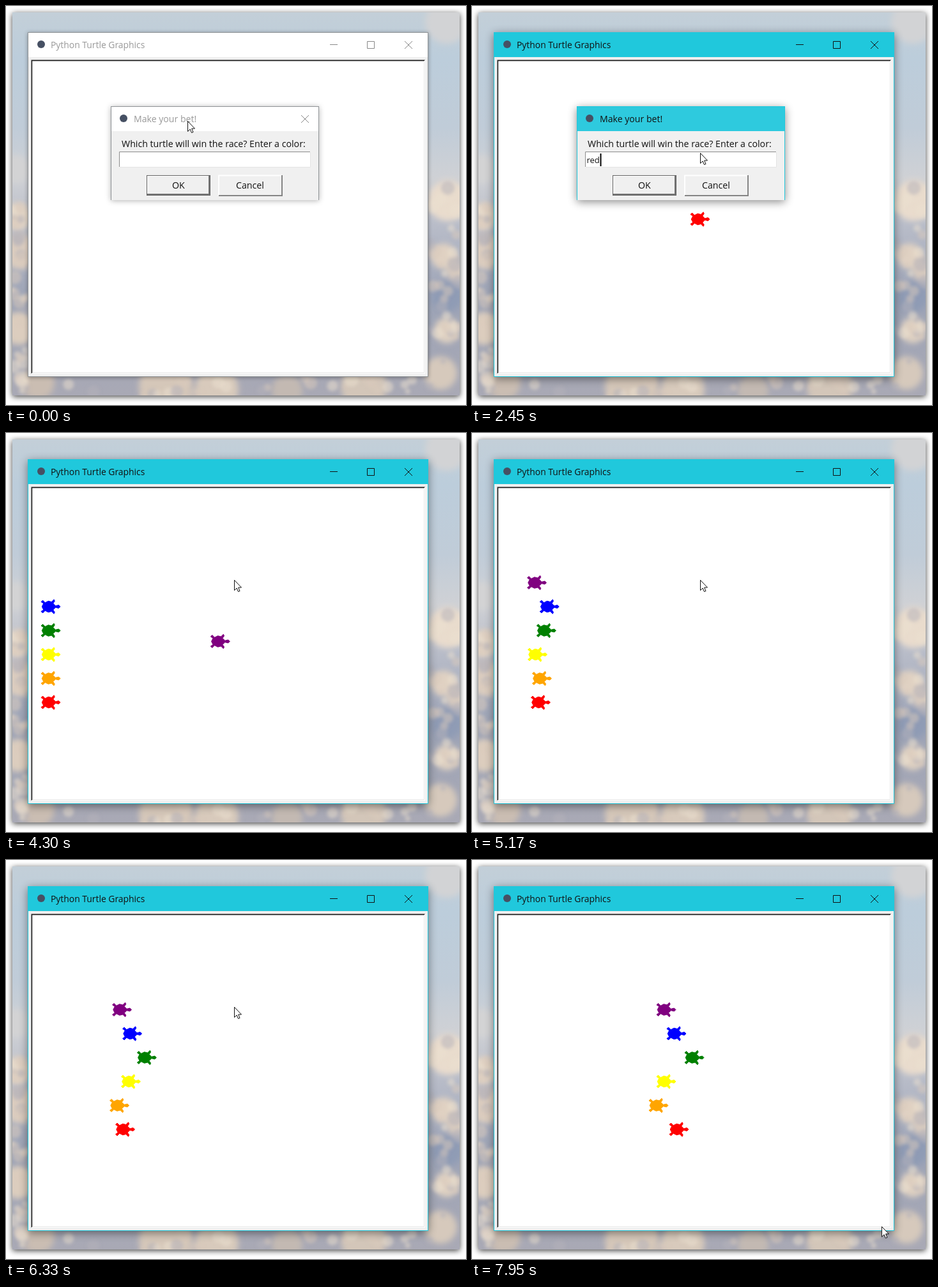
Write an HTML page that moves like this. It is 720 by 625 pixels and loops after 8000 ms.

```html
<!DOCTYPE html>
<html lang="en">
<head>
<meta charset="utf-8">
<title>Turtle race</title>
<style>
  html, body { margin: 0; width: 100%; height: 100%; overflow: hidden; background: #fff; }
  svg { display: block; width: 720px; height: 625px; }
  text { font: 14.2px "Open Sans", "Noto Sans", sans-serif; fill: #111; }
  .title { font-size: 13.9px; }
  #frame { filter: drop-shadow(0 1px 3px rgba(0,0,0,.35)); }
  .on #frame { filter: drop-shadow(0 3px 7px rgba(0,0,0,.45)); }
  #box { filter: drop-shadow(0 1px 4px rgba(0,0,0,.3)); }
  .on #box { filter: drop-shadow(0 3px 7px rgba(0,0,0,.45)); }
  .edge { fill: #8f9396; }
  .bar { fill: #fff; }
  .title { fill: #999; }
  .ctl { fill: none; stroke: #888; }
  .on .edge, .on .bar { fill: #20c8dc; }
  .on .title { fill: #111; }
  .on .ctl { stroke: #111; }
  .closing .bar { fill: #2ecade; }
  .closing .ctl { display: none; }
  #dlg { transform-origin: 327px 236px; }
  .logo { fill: #465063; }
</style>
</head>
<body>
<svg viewBox="0 0 720 625">
  <defs>
    <linearGradient id="sky" x2="0" y2="1">
      <stop offset="0" stop-color="#c3cfd8"/>
      <stop offset=".12" stop-color="#bccddb"/>
      <stop offset=".3" stop-color="#c0ccd8"/>
      <stop offset=".43" stop-color="#cfd1d5"/>
      <stop offset=".55" stop-color="#b9bdc9"/>
      <stop offset=".75" stop-color="#9ca3b6"/>
      <stop offset="1" stop-color="#a9a9b5"/>
    </linearGradient>
    <clipPath id="crop"><rect x="10" y="10" width="700" height="600"/></clipPath>
    <filter id="soft" x="-50%" y="-50%" width="200%" height="200%"><feGaussianBlur stdDeviation="5"/></filter>
    <filter id="puff" x="-50%" y="-50%" width="200%" height="200%"><feGaussianBlur stdDeviation="2.5"/></filter>
  </defs>

  <rect x="10" y="10" width="700" height="600" fill="#c0ccd8" style="filter:drop-shadow(0 2px 5px rgba(0,0,0,.75))"/>
  <g clip-path="url(#crop)">
    <rect x="10" y="10" width="700" height="600" fill="url(#sky)"/>
    <g id="haze" filter="url(#soft)"></g>
    <g id="puffs" filter="url(#puff)"></g>
  </g>

  <g id="win">
    <rect id="frame" class="edge" x="34" y="41" width="627" height="540"/>
    <rect x="35" y="80" width="625" height="500" fill="#f0f0f0"/>
    <rect class="bar" x="35" y="42" width="625" height="38"/>
    <circle class="logo" cx="55" cy="60" r="6"/>
    <text class="title" x="70" y="66">Python Turtle Graphics</text>
    <path class="ctl" d="M507 60.5h12M565.5 55.5h11v11h-11zM624 55l12 12M636 55l-12 12"/>
    <rect x="39" y="84" width="617" height="492" fill="#fff"/>
    <path d="M39.5 576V84.5H656" fill="none" stroke="#a0a0a0"/>
    <path d="M40.5 575V85.5H655" fill="none" stroke="#222" stroke-width="1.4"/>
    <path d="M654.5 86V574.5H41" fill="none" stroke="#e6e6e6"/>
    <g id="turtles"></g>
  </g>

  <g id="dlg">
    <rect id="box" class="edge" x="164" y="157" width="326" height="147"/>
    <rect x="165" y="196" width="324" height="108" fill="#f0f0f0"/>
    <rect class="bar" x="165" y="158" width="324" height="38"/>
    <circle class="logo" cx="184" cy="176" r="6"/>
    <text class="title" x="200" y="182" style="font-size:14.1px">Make your bet!</text>
    <path class="ctl" d="M462 171l12 12M474 171l-12 12"/>
    <text x="181" y="221">Which turtle will win the race? Enter a color:</text>
    <rect x="177" y="228" width="300" height="25" fill="#fff"/>
    <path d="M177.5 252V228.5H476" fill="none" stroke="#8c8c8c"/>
    <path d="M476.5 229V252.5H178" fill="none" stroke="#e3e3e3"/>
    <text id="typed" x="179.5" y="246" style="font-size:13px"></text>
    <rect id="caret" y="231" width="2" height="20"/>
    <rect x="220.5" y="265.5" width="99" height="31" fill="#f0f0f0" stroke="#646464"/>
    <path d="M221.5 296V266.5H319" fill="none" stroke="#fff"/>
    <path d="M318 266V295H221" fill="none" stroke="#747474" stroke-width="2"/>
    <text x="260" y="286">OK</text>
    <path d="M333 297V265.5H432" fill="none" stroke="#fff" stroke-width="2"/>
    <path d="M432 265V297H333" fill="none" stroke="#858585" stroke-width="2"/>
    <text x="360" y="286">Cancel</text>
  </g>

  <path id="arrow" d="M.5.5V16.5L4.2 13 6.5 18.5 9 17.5 6.7 12H11.5Z" fill="#fff" stroke="#111"/>
  <path id="beam" d="M-3-8.5H-1L0-7.5 1-8.5H3M0-8V8M-3 8.5H-1L0 7.5 1 8.5H3" fill="none" stroke="#111"/>
</svg>
<script>
const $ = id => document.getElementById(id);
const make = (parent, tag, attrs) => {
  const el = document.createElementNS('http://www.w3.org/2000/svg', tag);
  for (const k in attrs) el.setAttribute(k, attrs[k]);
  return parent.appendChild(el);
};
const place = (el, x, y) => el.setAttribute('transform', `translate(${x} ${y})`);
const show = (el, on) => { el.style.display = on ? '' : 'none'; };
const lerp = (a, b, f) => a + (b - a) * f;

// value on a polyline of [time, ...values]
function along(pts, t) {
  if (t <= pts[0][0]) return pts[0].slice(1);
  for (let i = 1; i < pts.length; i++) {
    const [a, b] = [pts[i - 1], pts[i]];
    if (t <= b[0]) return b.slice(1).map((v, j) => lerp(a[j + 1], v, (t - a[0]) / (b[0] - a[0])));
  }
  return pts[pts.length - 1].slice(1);
}

// cloudy backdrop: main masses, then small seeded puffs
const masses = [
  [690, 25, 34, '#d2d3d5'], [15, 255, 22, '#d3d3d4'], [18, 330, 22, '#e2d4c5'], [22, 385, 28, '#dccdbf'],
  [20, 505, 26, '#dccdbe'], [50, 590, 26, '#cabdb2'], [250, 596, 42, '#d5c7b9'], [330, 600, 34, '#d8cabc'],
  [440, 602, 24, '#c3b9b2'], [560, 596, 36, '#d3c6b9'], [692, 305, 32, '#e9dccd'], [685, 392, 20, '#e0d2c3'],
  [705, 415, 16, '#d8cbbf'], [690, 455, 24, '#8f9bb5'], [690, 508, 20, '#dfd1c2'], [680, 575, 26, '#d6c9bc']
];
for (const [cx, cy, r, fill] of masses) make($('haze'), 'circle', { cx, cy, r, fill });
let seed = 11;
const rnd = () => (seed = seed * 16807 % 2147483647) / 2147483647;
for (let i = 0; i < 90; i++) {
  const side = i % 3;
  const cx = side == 0 ? 10 + rnd() * 25 : side == 1 ? 662 + rnd() * 48 : 30 + rnd() * 640;
  const cy = side == 2 ? 582 + rnd() * 28 : (side ? 278 : 315) + rnd() * 290;
  const fill = ['#ecdfd0', '#d9cabc', '#b3b1b9'][Math.floor(rnd() * 3)];
  make($('puffs'), 'circle', { cx, cy, r: 4 + rnd() * 8, fill, opacity: .5 });
}

// half of the turtle outline, nose first, mirrored for the other half
const half = [[16, 0], [14, 2], [10, 1], [7, 4], [9, 7], [8, 9], [5, 6], [1, 7], [-3, 5], [-6, 8], [-8, 6], [-5, 4], [-7, 0]];
const outline = [...half, ...half.slice(1, -1).reverse().map(([x, y]) => [x, -y])]
  .map(p => p.map(v => v * 1.25).join()).join(' ');

const OPEN = 2450, TICK = 77.46, TRIP = 351, HOME = [352, 334], LINE = 65;
const GO = OPEN + 6 * TRIP;
const racers = [
  ['red', [[5170, 103], [6330, 182], [7020, 226], [7950, 319]]],
  ['orange', [[5170, 105], [6330, 173], [6640, 187], [7020, 224], [7950, 287]]],
  ['yellow', [[5170, 98], [6330, 191], [7020, 241], [7950, 299]]],
  ['green', [[5170, 112], [6330, 216], [7020, 271], [7950, 343]]],
  ['blue', [[5170, 117], [6330, 193], [7020, 248], [7950, 315]]],
  ['purple', [[5170, 97], [6330, 177], [7020, 234], [7950, 299]]]
].map(([color, run], i) => ({
  run: [[GO, LINE], ...run],
  y: 422 - 37.5 * i,
  start: OPEN + TRIP * i,
  el: make($('turtles'), 'polygon', { points: outline, fill: color, stroke: color })
}));

const drift = [[6780, 357, 230], [6950, 337, 187], [7180, 337, 187], [7490, 448, 275], [7950, 641, 574]];
const hops = [[0, 284, 180], [70, 256, 212], [100, 228, 244], [660, 268, 240], [730, 320, 235], [800, 359.5, 232]];

function draw(t) {
  const tick = Math.floor((t - OPEN) / TICK + .1);
  const now = OPEN + tick * TICK;
  const open = tick >= 0;

  // windows
  $('win').setAttribute('class', open ? 'on' : '');
  $('dlg').setAttribute('class', (t >= 420 ? 'on' : '') + (open ? ' closing' : ''));
  show($('dlg'), tick < 2);
  $('dlg').style.opacity = tick == 1 ? .35 : 1;
  $('dlg').style.transform = tick == 1 ? 'scale(.95)' : 'none';

  // typing
  const n = [950, 1040, 1270].filter(k => t >= k).length;
  $('typed').textContent = 'red'.slice(0, n);
  $('caret').setAttribute('x', [178.5, 185, 191, 200.5][n]);
  show($('caret'), t >= 420 && !(t >= 1990 && t < 2280));

  // turtles walk to the line in turn, then race
  for (const r of racers) {
    show(r.el, open && now >= r.start - 1);
    const f = Math.min(1, Math.max(0, (now - r.start) / TRIP));
    const x = now < GO ? lerp(HOME[0], LINE, f) : along(r.run, now)[0];
    place(r.el, x, lerp(HOME[1], r.y, f));
  }

  // pointer
  const beam = t >= 100 && !open;
  show($('beam'), beam);
  show($('arrow'), !beam);
  const [x, y] = open ? along(drift, now) : hops.filter(h => t >= h[0]).pop().slice(1);
  place(beam ? $('beam') : $('arrow'), x, y);
}

function loop() {
  draw(performance.now() % 8000);
  requestAnimationFrame(loop);
}
loop();
</script>
</body>
</html>
```
